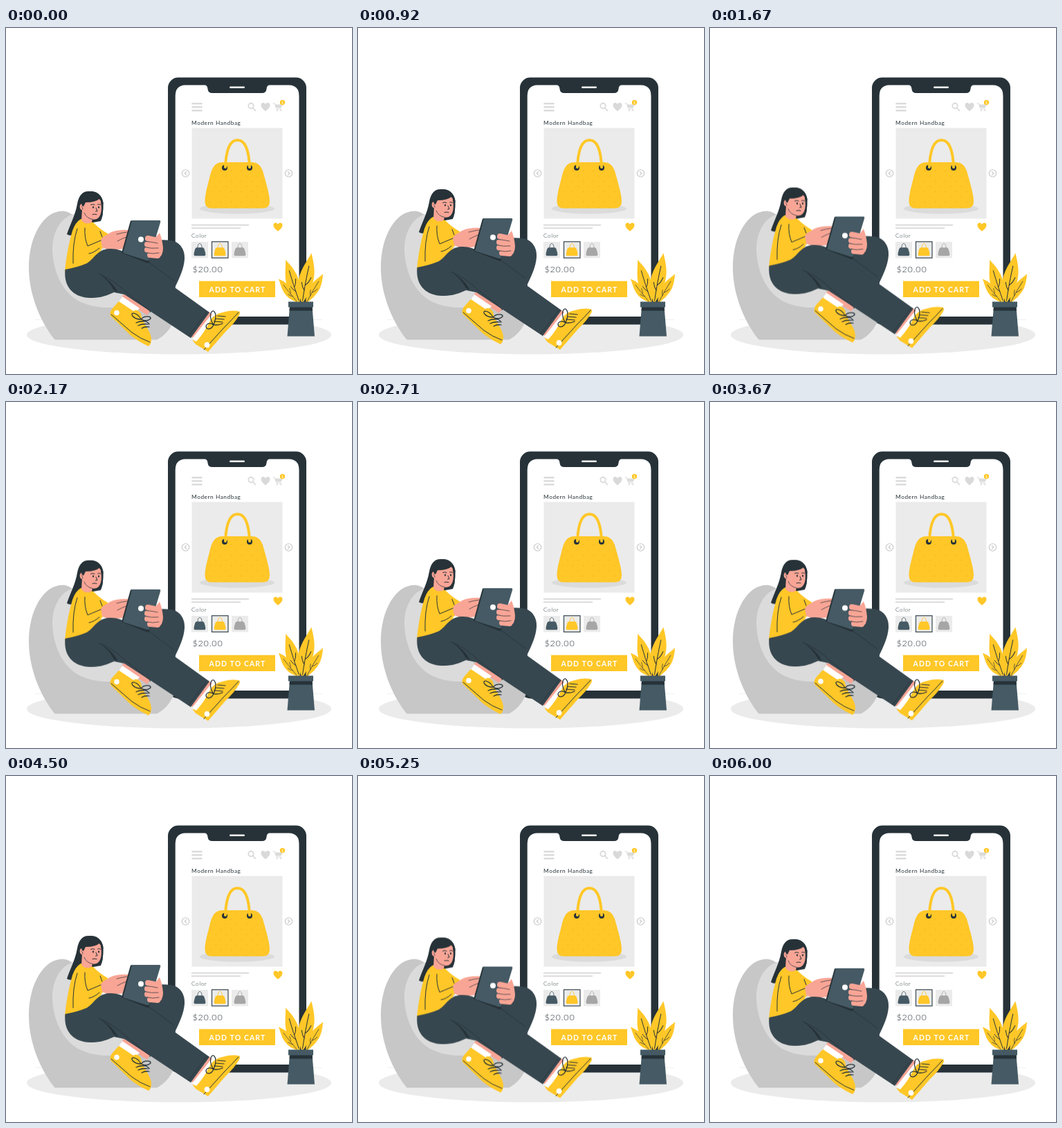
An HTML page that plays this animation: 500 by 500 pixels, repeating every 6.04 s.

```html
<!DOCTYPE html>
<html lang="en">
<head>
<meta charset="utf-8">
<title>Handbag shop</title>
<style>
  html, body { margin: 0; width: 100%; height: 100%; overflow: hidden; background: #fff; }
  svg { display: block; width: 100%; height: 100%; }
  text { font-family: Lato, sans-serif; fill: #263238; letter-spacing: .55px; }
  .yellow { fill: #ffc727; }
  .dark { fill: #263238; }
  .slate { fill: #455a64; }
  .pants { fill: #37474f; }
  .skin { fill: #f8a596; }
  .light { fill: #ebebeb; }
  .grey { fill: #dbdbdb; }
  .white { fill: #fff; }
  .line { fill: none; stroke: #263238; stroke-width: 1; stroke-linecap: round; stroke-linejoin: round; }
  .fine { stroke-width: .7; }
  .lace { stroke-width: 1.25; }
  .soft { fill: none; stroke: #c7c7c7; stroke-width: 1.1; stroke-linecap: round; stroke-linejoin: round; }
  .person { animation: breathe 3.02s linear infinite alternate; }
  @keyframes breathe { to { transform: translateY(-10px); } }
</style>
</head>
<body>
<svg viewBox="0 0 500 500">
  <defs>
    <pattern id="dots" width="15" height="15" patternUnits="userSpaceOnUse">
      <circle cx="3" cy="4" r=".6" fill="#e2aa1e"/>
      <circle cx="10.5" cy="11.5" r=".6" fill="#e2aa1e"/>
    </pattern>
    <path id="bag" d="M313 194H355C368 194 371 205 374 217C378 232 381 242 381 251Q381 260.500 371 260.500H297Q287.500 260.500 287.500 251C287.500 242 290 232 294 217C297 205 300 194 313 194Z"/>
    <path id="handle" d="M317 201C318 176 324 162 334.500 162S351 176 352 201" fill="none"/>
    <g id="mini">
      <use href="#bag" stroke="none"/>
      <use href="#handle" stroke-width="5"/>
    </g>
    <path id="heart" d="M0 6C-4 3-6.500 0-6.500-2.800C-6.500-6.800-1.500-7.400 0-3.800C1.500-7.400 6.500-6.800 6.500-2.800C6.500 0 4 3 0 6Z"/>
    <g id="leaf">
      <path class="yellow" d="M0 2C-5-8-12-18-11-35C-10-50-4-60 0-73C6-60 11-48 10-34C9-18 4-8 0 2Z"/>
      <path class="line" d="M0-3Q-1-30 0-54M0-18Q-4-22-6-29M0-26Q4-30 6-38"/>
    </g>
  </defs>

  <path d="M42 421.500H457" stroke="#ebebeb" stroke-width=".7"/>
  <ellipse class="light" cx="250" cy="443.500" rx="220" ry="28"/>

  <!-- phone -->
  <rect class="dark" x="234" y="71.500" width="200" height="357" rx="15"/>
  <path class="white" d="M259 82.500H287Q291 82.500 291.500 88Q292 94 298 94H370Q376 94 376.500 88Q377 82.500 381 82.500H409Q423.500 83 423.500 98V403Q423.500 417 409 417H259Q244.700 417 244.700 403V98Q244.700 83 259 82.500Z"/>
  <rect class="white" x="323" y="84.500" width="22" height="2.400" rx="1.200"/>

  <!-- toolbar -->
  <g fill="none" stroke="#dbdbdb" stroke-linecap="round" stroke-linejoin="round">
    <path d="M269.500 109.200H282.500M269.500 114.200H282.500M269.500 119.200H282.500" stroke-width="2.500"/>
    <g stroke-width="1.900">
      <circle cx="354" cy="112.500" r="3.700"/>
      <path d="M357 115.500L360.300 119.300"/>
    </g>
    <path d="M386 109H388.500L391 117H398"/>
    <path d="M389.300 111H399L397.300 115H390.500Z" fill="#dbdbdb"/>
    <circle cx="391.700" cy="119" r=".8"/><circle cx="397" cy="119" r=".8"/>
  </g>
  <use href="#heart" x="375" y="114.200" fill="#d9d9d9"/>
  <circle class="yellow" cx="399.500" cy="107.600" r="3.700"/>
  <text x="399.700" y="109.700" text-anchor="middle" style="font-size:5.500px;fill:#fff;letter-spacing:0;font-weight:bold">1</text>

  <!-- product -->
  <text x="268" y="140" font-size="8.300">Modern Handbag</text>
  <rect class="light" x="268.500" y="144.500" width="131" height="131"/>
  <ellipse class="grey" cx="334" cy="261" rx="54" ry="7.500"/>
  <use href="#bag" class="yellow"/>
  <use href="#bag" fill="url(#dots)"/>
  <circle class="dark" cx="316" cy="202" r="4"/>
  <circle class="dark" cx="352" cy="202" r="4"/>
  <use href="#handle" stroke="#ffc727" stroke-width="4" stroke-linecap="round"/>
  <g class="soft">
    <circle cx="259.500" cy="210" r="5.200"/><path d="M260.700 207.700L258.200 210L260.700 212.300"/>
    <circle cx="408.500" cy="210" r="5.200"/><path d="M407.300 207.700L409.800 210L407.300 212.300"/>
  </g>
  <rect class="grey" x="268" y="283.700" width="83" height="2"/>
  <rect class="grey" x="268" y="288.200" width="71" height="2"/>
  <use href="#heart" x="393" y="287.800" class="yellow"/>

  <text x="268" y="303" font-size="8.300" font-weight="300">Color</text>
  <rect class="light" x="268" y="309" width="24" height="23.500"/>
  <rect class="light" x="297.500" y="308.800" width="23.500" height="23.500" stroke="#37474f" stroke-width="1.200"/>
  <rect class="light" x="326" y="309" width="24" height="23.500"/>
  <use href="#mini" fill="#455a64" stroke="#455a64" transform="translate(219.800 282.300) scale(.18)"/>
  <use href="#mini" fill="#ffc727" stroke="#ffc727" transform="translate(249 282.300) scale(.18)"/>
  <use href="#mini" fill="#a6a6a6" stroke="#a6a6a6" transform="translate(277.800 282.300) scale(.18)"/>

  <text x="269.500" y="353" font-size="12.500" font-weight="300" style="letter-spacing:.8px">$20.00</text>
  <rect class="yellow" x="279" y="365.700" width="110" height="23.300"/>
  <text x="334.500" y="381.500" text-anchor="middle" font-size="10.500" font-weight="bold" style="fill:#fff;letter-spacing:1.100px">ADD TO CART</text>

  <!-- plant -->
  <use href="#leaf" transform="translate(424 396) rotate(-18) scale(.88)"/>
  <use href="#leaf" transform="translate(434 397) rotate(30) scale(.66)"/>
  <use href="#leaf" transform="translate(421 396) rotate(-39) scale(.59)"/>
  <use href="#leaf" transform="translate(428 397) rotate(10.500)"/>
  <path class="slate" d="M410 403H442.500L446 445.500H406.500Z"/>
  <path class="dark" d="M410 403H442.500L443 408.500H409.500Z"/>
  <rect class="slate" x="408" y="395.500" width="36" height="8"/>

  <!-- beanbag -->
  <path fill="#c7c7c7" d="M70.500 450.500C52 428 33 388 33 346C33 300 55 264 82 264.500C104 266 119 296 130 330L248 400C246 420 238 440 218 450.500Z"/>
  <path class="grey" d="M99 268.500C78 274 67 295 67 321C68 352 82 384 108 396C130 406 152 405 176 402L150 330C136 313 119 276 99 268.500Z"/>

  <g class="person">
    <!-- far leg -->
    <path class="pants" d="M150 340L205 309Q222 305 238 307C252 309 259 321 258 334C257 348 251 361 243 377L208 411L170 385L186 352Z"/>
    <path class="skin" d="M171 384L208 409L204 415L166 390Z"/>
    <path class="white" d="M168 388L193 405L187 411L163 396Z"/>
    <path class="yellow" d="M163 395L184 409Q190 405 195 413C196 424 209 437 210 449Q210 457 206 460Q191 453 180 444L151 416Q149 411 154 405Z"/>
    <path class="line" d="M152 414L182 440Q194 449 208 454"/>
    <circle class="white" cx="160" cy="411.500" r="3.800"/>
    <path class="line lace" d="M195 421C183 421 179 412 184 412Q191 413 195 421C200 415 210 416 209 420Q204 425 195 421Q203 423 207 428M188 426Q194 423 202 424M191 430Q197 427 205 428M196 434Q201 431 207 432"/>

    <!-- near foot -->
    <path class="skin" d="M293 410L298 414L274 450L267 446Z"/>
    <path class="white" d="M296 415L301 419L278 455L269 449Z"/>
    <path class="yellow" d="M269 450.500L275 453Q287 440 295 423Q301 413 313 411Q327 407 337 409.500Q339 411 337 415Q330 427 318 438L292 468L274 457Z"/>
    <path class="line" d="M336 411Q326 422 315 433L286 465"/>
    <circle class="white" cx="290.500" cy="458" r="3.900"/>
    <path class="line lace" d="M300 429C293 419 295 408 300 409Q306 414 300 429C293 424 287 429 290 434Q296 437 300 429M300 429Q307 430 313 427M301 424L313 425M303 420L315 421M306 416L317 417"/>

    <!-- hair behind -->
    <path class="dark" d="M121 236C110 235 105 243 103 254C100 271 93 283 88 298Q97 304 108 288L126 281L137 279C140 270 141 261 140.500 252C138 242 132 236 121 236Z"/>

    <!-- torso -->
    <path class="yellow" d="M108 276Q100 281 96 293C90 314 87 332 85 352L120 346L135 328L138 319L147 297Q136 291 126 281Z"/>
    <path class="skin" d="M110 262L126 273L124 280Q118 287 109 278Z"/>

    <!-- head -->
    <path class="skin" d="M112 248C118 242 133 243 137 250C139 262 138 273 131 276C121 279 113 271 111 264Q105 261 107 256Q109 252 113 256Z"/>
    <path class="dark" d="M110 257C106 245 114 236 123 236C134 236 141 245 140.500 256Q139 250 136 246Q130 252 115 252L112 258Z"/>
    <path class="dark" d="M138 247Q142.500 262 138 278Q139.500 263 137 250Z"/>
    <ellipse class="dark" cx="126" cy="259" rx="1.100" ry="1.500"/>
    <ellipse class="dark" cx="134" cy="259" rx="1.100" ry="1.500"/>
    <path class="line" d="M122.500 255.500Q125 253.800 128 255.500M132.500 255Q134.500 253.800 136.500 255.300M130 260L132 264.500L129.500 265M125 269.500Q128 268.500 131 269.500"/>
    <path class="line fine" d="M109 258Q111 259 111 262M113 267Q116 275 125 276.500"/>

    <!-- near arm -->
    <path class="skin" d="M136 306L150 296Q161 291 178 292L171 319Q157 321 146 320L135 315Z"/>
    <path class="yellow" d="M116 282Q127 282 138 293L150 299Q141 308 140 318L121 324Q110 313 112 296Z"/>
    <path class="skin" d="M150 297Q141 300 137 306L139 317L152 321Z"/>
    <path class="line" d="M114 289Q113 303 118 315L137 307M136 294L139 302M103 290Q96 311 97 340M120 326Q127 325 135 318"/>
    <path class="line fine" d="M175 295Q167 296 160 298M174 302Q168 304 161 308"/>

    <!-- near leg -->
    <path class="pants" d="M85.500 349Q103 346 117 340C128 333 132 320 149 319Q163 318 177 327L294 411L267 448L208 409L171 385L156 382C141 389 133 390 121 390C98 389 83 375 85.500 349Z"/>
    <path class="dark" d="M134 355Q149 365 156 379L162 382Q154 366 134 355Z"/>
    <path class="line fine" d="M134 355Q154 363 173 381L208 409M290 411L264 445M204 337Q225 352 242 365"/>

    <!-- tablet -->
    <path class="dark" d="M180 278.500L184 278L172 326L208 337L205 340L167 325Z"/>
    <path class="slate" d="M182 278H221.500Q224 278 223 281L207 334Q206 337 203 336L169 325Z"/>
    <circle class="white" cx="195" cy="305.500" r="4"/>

    <!-- far hand -->
    <path class="skin" d="M215 304L222 296Q226 306 227 318Q227 330 219 333L212 330Z"/>
    <path d="M205 304L219 307M204 312.500L220 314M204 320.500L220 321.500M208 328L219 329" stroke="#f8a596" stroke-width="8" stroke-linecap="round"/>
    <path class="line fine" d="M202 308.500Q210 309 219 311M202 317Q210 319 220 318M204 325Q212 327 221 325"/>
  </g>
</svg>
</body>
</html>
```
